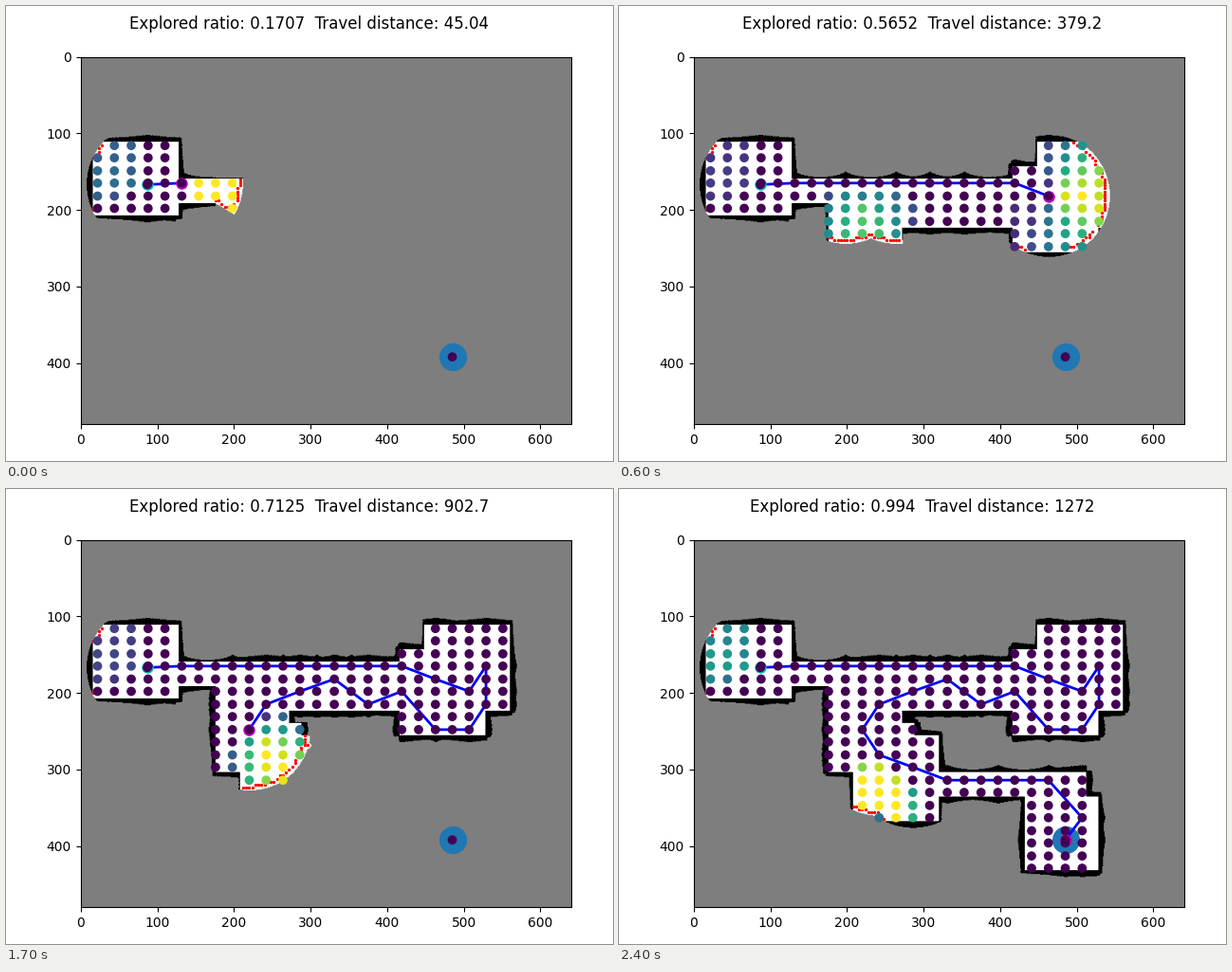
Write a matplotlib script that moves like this. It is 640x480 px and loops after 2500 ms.

```python
import numpy as np
import matplotlib.pyplot as plt
from matplotlib.animation import FuncAnimation

W, H = 640, 480
WALL, UNKNOWN, FREE = 1, 127, 255
REACH = 80        # sensor range
SIGHT = 64        # range within which a node counts frontier cells
MIN_COUNT = 3     # nodes that see no more than this are useless
WALL_DEPTH = 10   # how far a ray looks into a wall
CELL = 4          # frontier grid size
TILE = 16         # floor plan unit
MAX_HOP = 3       # longest move between scans, in grid steps

# Free space in tiles: left, top, right, bottom
ROOMS = [
    (1, 7, 8, 13), (8, 10, 26, 12), (11, 10, 26, 14), (11, 10, 17, 19),
    (17, 15, 18, 16), (13, 16, 20, 23), (26, 9, 33, 16), (28, 7, 35, 14),
    (20, 19, 32, 21), (27, 21, 33, 27),
]
START, GOAL = (87, 167), (485, 392)
# Turning points of the tour, as column and row of the node grid
TURNS = [
    (6, 10), (12, 10), (16, 10), (19, 10), (23, 12), (24, 10), (24, 13),
    (23, 15), (21, 15), (19, 12), (17, 13), (15, 11), (11, 13), (10, 15),
    (11, 17), (15, 19), (21, 19), (23, 22),
]

world = np.full((H, W), WALL)
for left, top, right, bottom in ROOMS:
    world[top * TILE:bottom * TILE, left * TILE:right * TILE] = FREE

grid_x = np.linspace(0, W - 1, 30).round().astype(int)
grid_y = np.linspace(0, H - 1, 30).round().astype(int)
grid = np.array([(x, y) for x in grid_x for y in grid_y])


def plan_route():
    """Split every leg of the tour into equal hops."""
    stops = [np.array(TURNS[0])]
    for a, b in zip(np.array(TURNS), np.array(TURNS[1:])):
        hops = -(-abs(b - a).max() // MAX_HOP)
        stops += [a + (b - a) * n // hops for n in range(1, hops + 1)]
    return np.array([START] + [(grid_x[i], grid_y[j]) for i, j in stops]
                    + [GOAL])


def scan(belief, x0, y0):
    """Cast rays in all directions and write what they meet into belief."""
    angle = np.radians(np.arange(0, 360, 0.5))
    x1 = np.rint(x0 + REACH * np.cos(angle)).astype(int)
    y1 = np.rint(y0 + REACH * np.sin(angle)).astype(int)
    dx, dy = abs(x1 - x0), abs(y1 - y0)
    sx, sy = np.where(x1 > x0, 1, -1), np.where(y1 > y0, 1, -1)
    x, y = np.full_like(x1, x0), np.full_like(y1, y0)
    err = dx - dy
    hits = np.zeros_like(x)
    live = np.ones(len(x), bool)
    for _ in range(120):
        seen = world[y, x]
        hits += seen == WALL
        live &= ~((hits >= WALL_DEPTH) | ((seen != WALL) & (hits > 0))
                  | ((x == x1) & (y == y1)))
        belief[y[live], x[live]] = seen[live]
        across = err > 0
        x += np.where(live & across, sx, 0)
        y += np.where(live & ~across, sy, 0)
        err += np.where(across, -2 * dy, 2 * dx)


def find_frontiers(belief):
    """Free cells of the coarse grid that border on unknown ones."""
    coarse = belief.reshape(H // CELL, CELL, W // CELL, CELL).min(axis=(1, 3))
    pad = np.pad((coarse == UNKNOWN).astype(int), 1)
    rows, cols = coarse.shape
    count = sum(pad[r:r + rows, c:c + cols]
                for r in range(3) for c in range(3) if (r, c) != (1, 1))
    y, x = np.nonzero((coarse == FREE) & (count > 1) & (count < 8))
    return np.column_stack([x, y]) * CELL


def count_visible(nodes, frontiers, belief):
    """Number of frontier cells each node can see."""
    gap = np.linalg.norm(nodes[:, None] - frontiers[None], axis=-1)
    n, f = np.nonzero(gap < SIGHT)
    t = np.linspace(0, 1, 81)[:, None]
    line = nodes[n][:, None] * (1 - t) + frontiers[f][:, None] * t
    px = np.rint(line).astype(int)
    clear = (belief[px[..., 1], px[..., 0]] == FREE).all(axis=1)
    counts = np.bincount(n[clear], minlength=len(nodes))
    return np.where(counts > MIN_COUNT, counts, 0)


def explore(route):
    belief = np.full((H, W), UNKNOWN)
    scan(belief, *START)
    steps = []
    for k in range(1, len(route)):
        scan(belief, *route[k])
        known = grid[belief[grid[:, 1], grid[:, 0]] == FREE]
        nodes = np.vstack([known, [START], [GOAL]])
        frontiers = find_frontiers(belief)
        utility = count_visible(nodes, frontiers, belief)
        visited = (nodes[:, None] == route[None, :k + 1]).all(-1).any(1)
        utility[visited] = 0
        steps.append((belief.copy(), nodes, utility, frontiers))
    return steps


route = plan_route()
steps = explore(route)
share = [(s[0] == FREE).sum() / (world == FREE).sum() for s in steps]
travel = np.cumsum(np.linalg.norm(np.diff(route, axis=0), axis=1))


def caption(k):
    return f"Explored ratio: {share[k]:.4g}  Travel distance: {travel[k]:.4g}"


fig, ax = plt.subplots(figsize=(6.4, 4.8), dpi=100)
image = ax.imshow(steps[0][0], cmap="gray", vmin=WALL, vmax=FREE)
ax.axis((0, W, H, 0))
ax.plot(*GOAL, "o", color="C0", markersize=20)
path, = ax.plot([], [], "b", linewidth=2)
robot, = ax.plot([], [], "mo", markersize=8)
ax.plot(*START, "co", markersize=8)
edge_dots = ax.scatter([], [], c="r", s=2, zorder=3)
node_dots = ax.scatter(*steps[0][1].T, c=steps[0][2], zorder=5)
title = fig.suptitle(caption(0))
fig.tight_layout()


def update(k):
    belief, nodes, utility, frontiers = steps[k]
    image.set_data(belief)
    path.set_data(*route[:k + 2].T)
    robot.set_data(*route[k + 1:k + 2].T)
    edge_dots.set_offsets(frontiers)
    node_dots.set_offsets(nodes)
    node_dots.set_array(utility)
    node_dots.set_clim(0, max(utility.max(), 1))
    title.set_text(caption(k))
    return image, path, robot, edge_dots, node_dots, title


anim = FuncAnimation(fig, update, frames=len(steps), interval=100, repeat=True)
plt.show()
```
